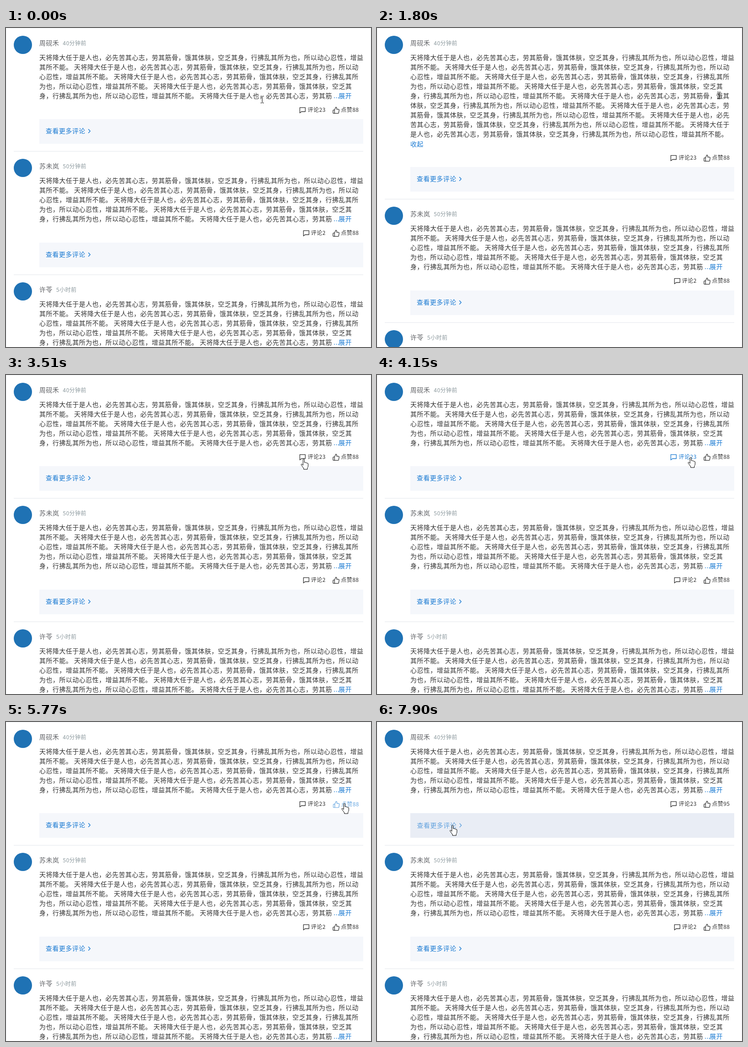
Animation of 800 by 700 pixels, one loop 7.99 s. Source, as an HTML page:

```html
<!DOCTYPE html>
<html lang="zh-CN">
<head>
<meta charset="utf-8">
<title>评论列表</title>
<style>
html, body { margin: 0; width: 100%; height: 100%; overflow: hidden; background: #fff; }
#stage {
  position: relative; width: 800px; height: 700px; overflow: hidden; background: #fff;
  font: 14px/21px "Noto Sans CJK SC", "Noto Sans CJK", sans-serif;
  letter-spacing: .5px; color: #333; text-spacing-trim: space-all;
}
#stage::after {
  content: ""; position: absolute; inset: 0;
  border: 1px solid #f0f2f6; border-bottom: 0;
}
.post, .below, .avatar, .head, .body, .fold, .dots, .more, .actions, .box, .rule, #cursor svg { position: absolute; }
.post, .below { left: 0; top: 0; width: 800px; }
.avatar { left: 17px; top: 17px; width: 40px; height: 40px; border-radius: 50%; background: #1f72b4; }
.head { left: 73px; top: 22px; color: #606266; white-space: nowrap; }
.head small { margin-left: 8px; font-size: 12px; color: #8b989d; }
.body { left: 73px; top: 54px; width: 711px; }
.fold { left: 73px; top: 244px; }
.more { left: 0; top: 0; }
.more span { position: absolute; top: 138px; white-space: nowrap; }
.fold, .more, .link { color: #1a7ad2; }
.actions { right: 26.5px; top: 170px; display: flex; font-size: 12px; line-height: 18px; }
.act { display: flex; }
.act svg { margin-top: 3px; fill: none; stroke: currentColor; stroke-linejoin: round; }
.comment svg { margin-right: 4px; }
.like { margin-left: 15.5px; }
.like svg { margin-right: 3px; }
.box { left: 73px; top: 200px; width: 710px; height: 54px; background: #f5f7fb; }
.link { position: absolute; left: 14px; top: 15px; white-space: nowrap; }
.link svg { position: absolute; left: 92px; top: 6px; fill: none; stroke: currentColor; stroke-width: 1.4; }
.rule { left: 17px; top: 270px; width: 766px; height: 1px; background: #e3e6ec; }
.act.hover { color: #1a7ad2; }
.fold.hover, .more.hover, .box.hover .link { color: #3a8fdf; }
.box.hover { background: #e9edf5; }
.act.press, .fold.press, .more.press, .box.press .link {
  color: #1a7ad2; opacity: .65; font-weight: 500; transform: translate(.5px, .5px);
}
#cursor { position: absolute; left: 0; top: 0; z-index: 2; }
#cursor svg { overflow: visible; fill: #fff; stroke: #000; }
</style>
</head>
<body>
<div id="stage"></div>
<script>
const LOOP = 7990, GROWTH = 105;
const QUOTE = '天将降大任于是人也，必先苦其心志，劳其筋骨，饿其体肤，空乏其身，' +
  '行拂乱其所为也，所以动心忍性，增益其所不能。';
const FULL = Array(8).fill(QUOTE).join(' ');
const SHORT = FULL.slice(0, 240);

// lower: how far the part under the text sits beyond the regular spacing
const POSTS = [
  { name: '周砚禾', ago: '40分钟前', comments: 23, top: 0, lower: 0 },
  { name: '苏未岚', ago: '50分钟前', comments: 2, top: 270, lower: 1 },
  { name: '许苓', ago: '5小时前', comments: 6, top: 541, lower: 0 }
];

const BUBBLE = '<svg width="14" height="14" stroke-width="1.3"><path d="M1 1.7h12v8.8H4.6L1 13.4z"/></svg>';
const THUMB = '<svg width="15" height="15" viewBox="1 1 22 22" stroke-width="1.9"><path d="M14 9V5a3 3 0 0 0-3-3L7 11v11h11.3a2 2 0 0 0 2-1.7l1.4-9a2 2 0 0 0-2-2.3zM7 22H4a2 2 0 0 1-2-2v-7a2 2 0 0 1 2-2h3"/></svg>';
const CHEVRON = '<svg width="8" height="11"><path d="M1.5 1l4 4.3-4 4.3"/></svg>';

const postHtml = p => `
  <div class="post" style="top:${p.top}px">
    <div class="avatar"></div>
    <div class="head">${p.name}<small>${p.ago}</small></div>
    <div class="body">${SHORT}</div>
    <div class="more"><span style="left:718px">...</span><span style="left:729px">展开</span></div>
    <div class="fold" hidden>收起</div>
    <div class="below">
      <div class="actions">
        <div class="act comment">${BUBBLE}评论${p.comments}</div>
        <div class="act like">${THUMB}<span>点赞88</span></div>
      </div>
      <div class="box" style="margin-top:${p.lower}px"><div class="link">查看更多评论${CHEVRON}</div></div>
      <div class="rule" style="margin-top:${p.lower}px"></div>
    </div>
  </div>`;

const stage = document.getElementById('stage');
stage.innerHTML = POSTS.map(postHtml).join('') + `
  <div id="cursor">
    <svg data-kind="text" width="7" height="16" style="left:-3px;top:-8px"><path fill="none" d="M0 .5h2.5l1 1 1-1H7M3.5 1.5v13M0 15.5h2.5l1-1 1 1H7"/></svg>
    <svg data-kind="hand" width="17" height="24" style="left:-6px;top:0"><path d="M5 2c0-2 3-2 3 0v6.2c.5-1.1 2.8-.9 2.8.5.5-.8 2.6-.5 2.6.9.6-.7 2.8-.4 2.8 1.3v5c0 2-1.7 3.2-1.7 5V23H6.5v-2C5 18 2.6 16 1 13.2c-.8-1.5 1-2.4 2.2-1.2L5 14z"/></svg>
    <svg data-kind="arrow" width="12" height="20" style="left:0;top:0"><path d="M.5 .8v15.7l3.6-3.4 2.4 5.6 2.4-1-2.4-5.5h5z"/></svg>
  </div>`;

const posts = [...stage.querySelectorAll('.post')];
const first = posts[0];
const part = name => first.querySelector('.' + name);
const targets = Object.fromEntries(['more', 'fold', 'comment', 'like', 'box'].map(n => [n, part(n)]));
const body = part('body'), below = part('below'), likes = part('like span');
const cursor = document.getElementById('cursor');
const shapes = [...cursor.children];

// time, x, y
const PATH = [
  [0, 561, 157], [70, 561, 157], [330, 655, 137], [630, 750, 148], [1800, 750, 148],
  [2350, 85, 263], [2520, 85, 263], [2660, 85, 258], [2860, 85, 258], [3300, 552, 200],
  [3360, 552, 200], [3510, 652, 184], [3680, 687, 180], [5200, 687, 180],
  [5620, 741, 178], [6760, 741, 178], [7270, 165, 226], [LOOP, 165, 226]
];
const PRESSES = [[950, 1100], [2700, 2810], [3830, 3910], [4930, 5090], [7820, LOOP]];
const EXPAND = 1100, COLLAPSE = 2810;
const LIKE = { start: 5710, period: 154, hold: 77, clicks: 7 };

const between = (v, a, b) => v >= a && v < b;
const isOpen = t => between(t, EXPAND, COLLAPSE);

function pointAt(t) {
  const i = Math.max(1, PATH.findIndex(k => k[0] > t));
  const [t0, x0, y0] = PATH[i - 1], [t1, x1, y1] = PATH[i];
  const u = Math.min(1, Math.max(0, (t - t0) / (t1 - t0)));
  return [x0 + (x1 - x0) * u, y0 + (y1 - y0) * u];
}

function hit([x, y], open) {
  const dy = open ? GROWTH : 0;
  const inside = (l, t, r, b) => between(x, l, r) && between(y, t, b);
  if (!open && inside(718, 139, 759, 160)) return 'more';
  if (open && inside(73, 245, 103, 267)) return 'fold';
  if (inside(642, 171 + dy, 700, 190 + dy)) return 'comment';
  if (inside(715, 171 + dy, 774, 190 + dy)) return 'like';
  if (inside(73, 201 + dy, 783, 254 + dy)) return 'box';
  return inside(73, 55, 783, 160 + (open ? 84 : 0)) ? 'text' : '';
}

function likeState(t) {
  const { start, period, hold, clicks } = LIKE, since = t - start;
  const done = Math.floor((since - hold) / period) + 1;
  return {
    count: 88 + Math.min(clicks, Math.max(0, done)),
    down: between(since, 0, clicks * period) && since % period < hold
  };
}

let wasOpen = false;
function setOpen(open) {
  if (open === wasOpen) return;
  wasOpen = open;
  const shift = open ? GROWTH : 0;
  body.textContent = open ? FULL : SHORT;
  targets.more.hidden = open;
  targets.fold.hidden = !open;
  below.style.top = shift + 'px';
  posts.slice(1).forEach((el, i) => el.style.top = POSTS[i + 1].top + shift + 'px');
}

function render(t) {
  const open = isOpen(t), point = pointAt(t), like = likeState(t);
  setOpen(open);
  likes.textContent = '点赞' + like.count;

  const under = hit(point, open);
  const hovered = hit(pointAt(Math.max(0, t - 80)), open);
  const down = like.down || PRESSES.some(([a, b]) => between(t, a, b));
  for (const [name, el] of Object.entries(targets)) {
    el.classList.toggle('hover', name === hovered);
    el.classList.toggle('press', name === hovered && down);
  }

  const kind = under === 'text' || between(t, 950, EXPAND) ? 'text' : under ? 'hand' : 'arrow';
  shapes.forEach(s => s.style.display = s.dataset.kind === kind ? '' : 'none');
  cursor.style.transform = `translate(${point.map(Math.round).join('px,')}px)`;
}

const begin = performance.now();
function tick() {
  render((performance.now() - begin) % LOOP);
  requestAnimationFrame(tick);
}
tick();
</script>
</body>
</html>
```
